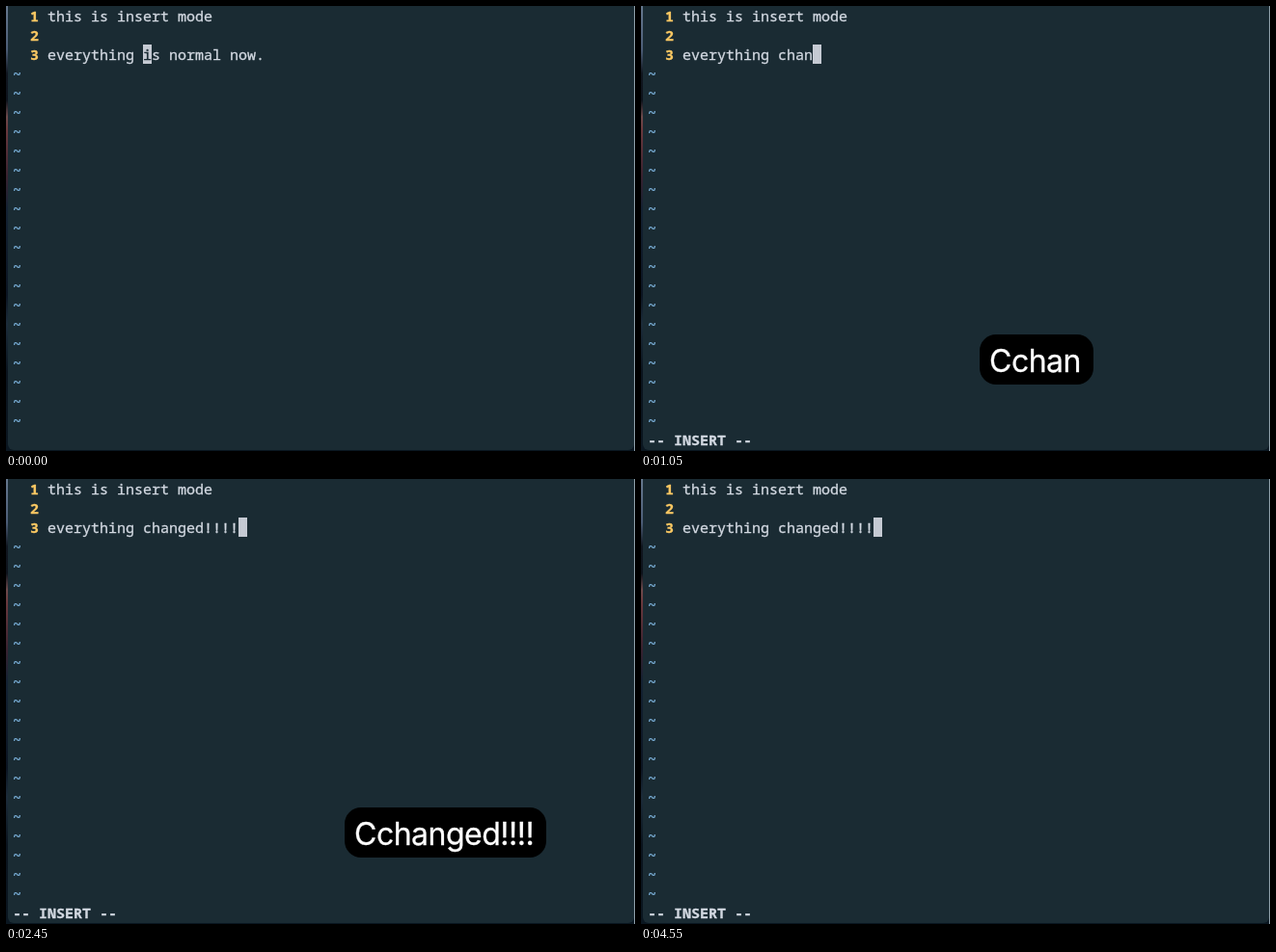
Recreate the animation shown at these times as an HTML page. Size 652 by 462 pixels, loop 4690 ms.

```html
<!DOCTYPE html>
<html lang="en">
<head>
<meta charset="utf-8">
<title>Insert mode</title>
<style>
  html, body { margin: 0; width: 100%; height: 100%; overflow: hidden; }
  body {
    position: relative;
    background: linear-gradient(#66788e, #4c5d77 45px, #10161f 70px, #0d131c 98px,
      #6d4a4c 115px, #6b3a3e 128px, #3b2330 175px, #142233 210px,
      #0b1522 300px, #1c2c3a 330px, #0a141e 380px, #0a1620);
  }
  body::after {
    content: ""; position: absolute; right: 0; top: 0; width: 1px; height: 100%;
    background: #8fa0aa;
  }
  #terminal {
    position: absolute; left: 2px; top: 0; width: 649px; height: 461px;
    border-radius: 0 0 6px 6px; background: #1a2b33;
  }
  pre {
    position: absolute; left: 5px; top: 0; margin: 0; color: #d3d9e2;
    font: 500 15px/20px "Noto Sans Mono", monospace; font-variant-ligatures: none;
    -webkit-text-stroke: 0.3px;
  }
  .number { color: #fac863; font-weight: 600; }
  .tilde { color: #7db3dc; }
  .cursor {
    display: inline-block; width: 9px; height: 20px; vertical-align: top;
    background: #c5cad3; color: #1a2b33;
  }
  #keys {
    position: absolute; left: 351px; top: 341px; height: 52px; padding: 0 12.6px 0 10px;
    border-radius: 17px; background: #000; color: #fff; white-space: pre;
    font: 32px/56px Inter, sans-serif; font-optical-sizing: none;
    letter-spacing: -0.5px; -webkit-text-stroke: 0.3px;
  }
</style>
</head>
<body>
<div id="terminal"><pre id="screen"></pre></div>
<div id="keys"></div>
<script>
const LOOP = 4690, STEP = 70;
const KEYS_SHOWN = 350, INSERT_START = 490, FADE_START = 4270, FADE_END = 4550;
const typed = "changed!!!!";
const keyTimes = [630, 770, 910, 980, 1120, 1260, 1400, 1750, 1890, 2030, 2170];

const screen = document.getElementById("screen");
const keys = document.getElementById("keys");
const span = (style, text) => `<span class="${style}">${text}</span>`;
const numbered = (n, text) => span("number", `  ${n}`) + " " + text;

function render(time) {
  const t = Math.floor((time % LOOP) / STEP) * STEP;
  const inserting = t >= INSERT_START;
  const text = typed.slice(0, keyTimes.filter(k => k <= t).length);
  const edit = inserting
    ? text + span("cursor", " ")
    : span("cursor", "i") + "s normal now.";

  screen.innerHTML = [
    numbered(1, "this is insert mode"),
    numbered(2, ""),
    numbered(3, "everything " + edit),
    ...Array(19).fill(span("tilde", "~")),
    inserting ? "<b>-- INSERT --</b>" : ""
  ].join("\n");

  const fade = (FADE_END - t) / (FADE_END - FADE_START);
  keys.textContent = "C" + text;
  keys.style.opacity = t < KEYS_SHOWN ? 0 : Math.max(0, Math.min(1, fade));
}

const start = performance.now();
function tick() {
  render(performance.now() - start);
  requestAnimationFrame(tick);
}
tick();
</script>
</body>
</html>
```
